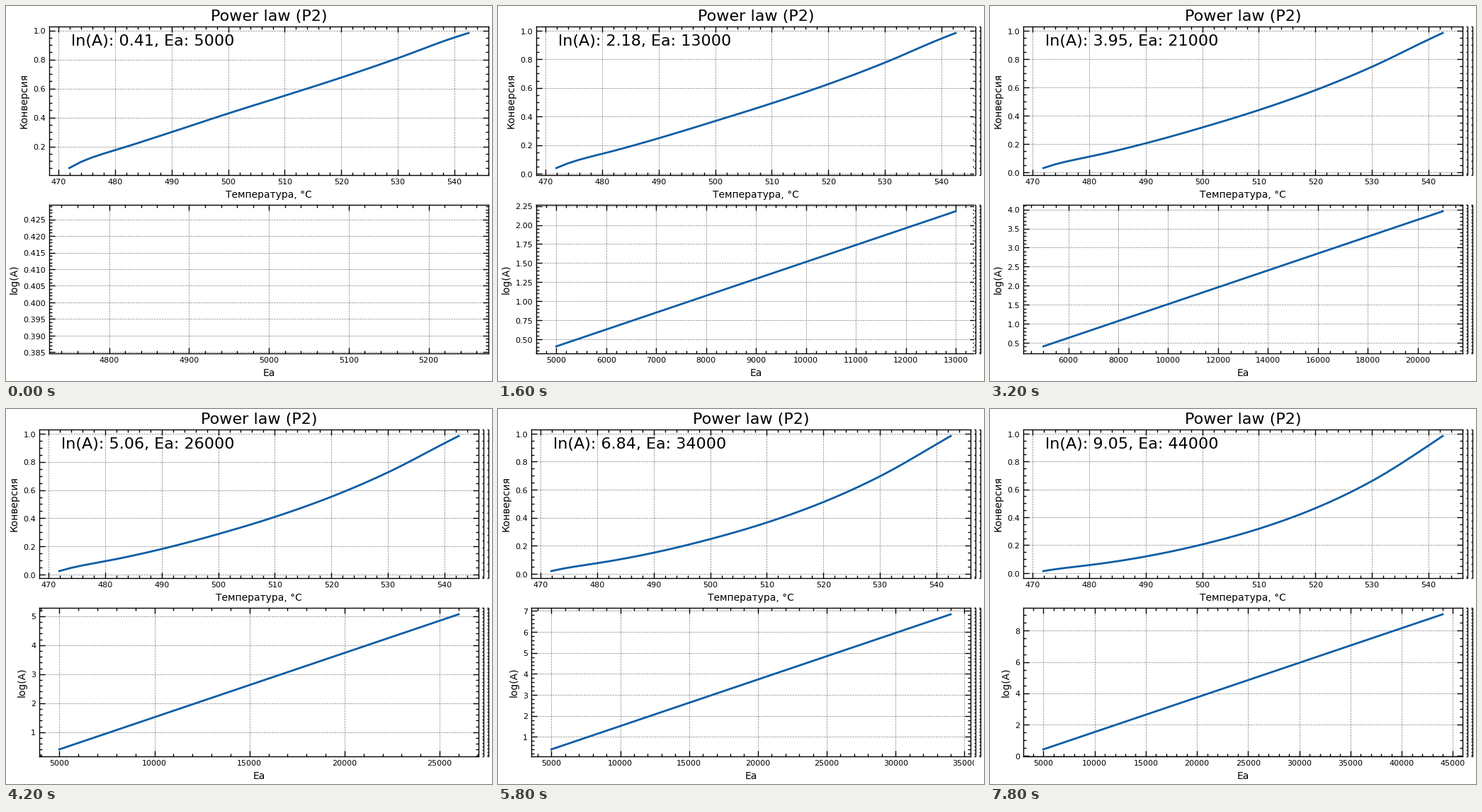
A matplotlib script for the animation above (8 s loop, 686 px wide and 530 px high).

```python
import numpy as np
import matplotlib.pyplot as plt
from matplotlib.animation import FuncAnimation
from matplotlib.collections import LineCollection
from matplotlib.patches import Rectangle
from matplotlib.transforms import Affine2D

W, H, DPI = 686, 530, 100
FRAMES, INTERVAL = 40, 200
AX_W, AX_H = 620, 210
LEFT = 61.167                      # left edge of the axes in the widest layout
BOTTOMS = (291.4167, 39.4167)      # upper and lower axes, from the stage bottom
TEXT_DROP = 0.75                   # text sits a little lower than the lines
DIGIT = 7                          # width of one tick label digit
MAJOR, MINOR = 6 * DPI / 72, 3 * DPI / 72
R = 8.314
BLUE = "#0C5DA5"

plt.rcParams.update({
    "font.family": "DejaVu Sans", "font.size": 10,
    "axes.titlesize": 16, "axes.labelsize": 10, "axes.linewidth": 1,
    "axes.grid": True, "grid.color": "k", "grid.alpha": 0.5,
    "grid.linestyle": "--", "grid.linewidth": 0.5, "lines.linewidth": 2,
})
for k in ("xtick", "ytick"):
    plt.rcParams.update({
        k + ".direction": "in", k + ".labelsize": 8, k + ".minor.visible": True,
        k + ".major.size": 6, k + ".minor.size": 3,
        k + ".major.width": 1, k + ".minor.width": 1,
    })
plt.rcParams.update({"xtick.top": True, "ytick.right": True})


def hermite(x, xs, ys):
    """Smooth curve through a few knots."""
    m = np.gradient(ys, xs)
    j = np.clip(np.searchsorted(xs, x) - 1, 0, len(xs) - 2)
    h = xs[j + 1] - xs[j]
    t = (x - xs[j]) / h
    return ((1 + 2 * t) * (1 - t) ** 2 * ys[j] + t * (1 - t) ** 2 * h * m[j]
            + t * t * (3 - 2 * t) * ys[j + 1] + t * t * (t - 1) * h * m[j + 1])


# Square root of the measured conversion against temperature
KNOT_T = np.array([471.93, 473.9, 475.8, 478.9, 482, 486, 490,
                   500, 510, 520, 530, 540, 542.5])
KNOT_U = np.array([.0610, .109, .144, .189, .230, .285, .340,
                   .474, .596, .715, .838, .9655, .9917])
TEMP = np.linspace(KNOT_T[0], KNOT_T[-1], 36)
ROOT = hermite(TEMP, KNOT_T, KNOT_U)

EA = 5000 + 1000 * np.arange(FRAMES)
LN_A = 0.4071 + (EA - 5000) / (R * TEMP[-1])


def conversion(i):
    return 2 * np.exp(LN_A[i] - EA[i] / (R * TEMP)) * ROOT


fig = plt.figure(figsize=(W / DPI, H / DPI), dpi=DPI, facecolor="white")
top, low = axes = [fig.add_axes([LEFT / W, b / H, AX_W / W, AX_H / H])
                   for b in BOTTOMS]
top.set_title("Power law (P2)")
top.set_xlabel("Температура, °C")
top.set_ylabel("Конверсия")
low.set_xlabel("Ea")
low.set_ylabel("log(A)")
curve, = top.plot([], [], color=BLUE)
trend, = low.plot([], [], color=BLUE)
note = top.text(0.05, 0.9, "", fontsize=16, va="center",
                transform=top.transAxes)

# The x labels follow their tick labels, so they need no drop of their own
texts = [note, top.title] + [ax.yaxis.label for ax in axes]
for ax in axes:
    for axis in (ax.xaxis, ax.yaxis):
        texts += [tick.label1 for tick in axis.get_major_ticks(16)]
drop = Affine2D().translate(0, -TEXT_DROP)
for text in texts:
    text.set_transform(text.get_transform() + drop)

# Overlay in pixels for the strips left behind at the right edge
over = fig.add_axes([0, 0, 1, 1], zorder=5)
over.set(xlim=(0, W), ylim=(0, H))
over.axis("off")
cover = over.add_patch(Rectangle((W, 0), 0, H, fc="white", ec="none"))
strips = LineCollection([], colors="k", linewidths=1)
over.add_collection(strips, autolim=False)


def set_data(i):
    curve.set_data(TEMP, conversion(i))
    trend.set_data(EA[:i + 1], LN_A[:i + 1])
    for ax in axes:
        ax.relim()
        ax.autoscale_view()


def label_shift(i):
    """Left shift of the layout, from the decimals on the lower axis."""
    if i == 0:
        return 0
    lo, hi = low.get_ylim()
    ticks = [v for v in low.yaxis.get_majorticklocs() if lo <= v <= hi]
    tenths = np.array(ticks) * 10
    short = np.allclose(tenths, np.round(tenths), atol=1e-6)
    return DIGIT * (2 if short else 1)


def strip_lines(shift, x0):
    """Right border and ticks of the current layout, from column x0 on."""
    x1 = LEFT + AX_W - shift
    segs = []
    for ax, b in zip(axes, BOTTOMS):
        segs += [[(x1, b), (x1, b + AX_H)],
                 [(x0, b), (x1, b)], [(x0, b + AX_H), (x1, b + AX_H)]]
        lo, hi = ax.get_ylim()
        for size, locs in ((MAJOR, ax.yaxis.get_majorticklocs()),
                           (MINOR, ax.yaxis.get_minorticklocs())):
            for v in locs:
                if lo <= v <= hi:
                    y = b + (v - lo) / (hi - lo) * AX_H
                    segs.append([(max(x0, x1 - size), y), (x1, y)])
    return segs


def plan():
    """For each frame: layout shift, visible width and leftover strips."""
    steps, last, inner, outer = [], 0, [], []
    for i in range(FRAMES):
        set_data(i)
        shift = label_shift(i)
        width = W - max(shift, last)
        segs = []
        if i == 0:
            outer = strip_lines(0, W - DIGIT)
        elif width == W - DIGIT:
            inner = strip_lines(shift, W - 2 * DIGIT)
            segs = outer
        else:
            segs = inner + outer
        steps.append((shift, width, segs))
        last = shift
    return steps


STEPS = plan()


def draw(i):
    shift, width, segs = STEPS[i]
    set_data(i)
    for ax, b in zip(axes, BOTTOMS):
        ax.set_position([(LEFT - shift) / W, b / H, AX_W / W, AX_H / H])
    note.set_text(f"ln(A): {LN_A[i]:.2f}, Ea: {EA[i]}")
    cover.set_x(width)
    cover.set_width(W - width)
    strips.set_segments(segs)
    return curve, trend, note, cover, strips


anim = FuncAnimation(fig, draw, frames=FRAMES, init_func=lambda: draw(0),
                     interval=INTERVAL, repeat=True, repeat_delay=0, blit=False)
plt.show()
```
